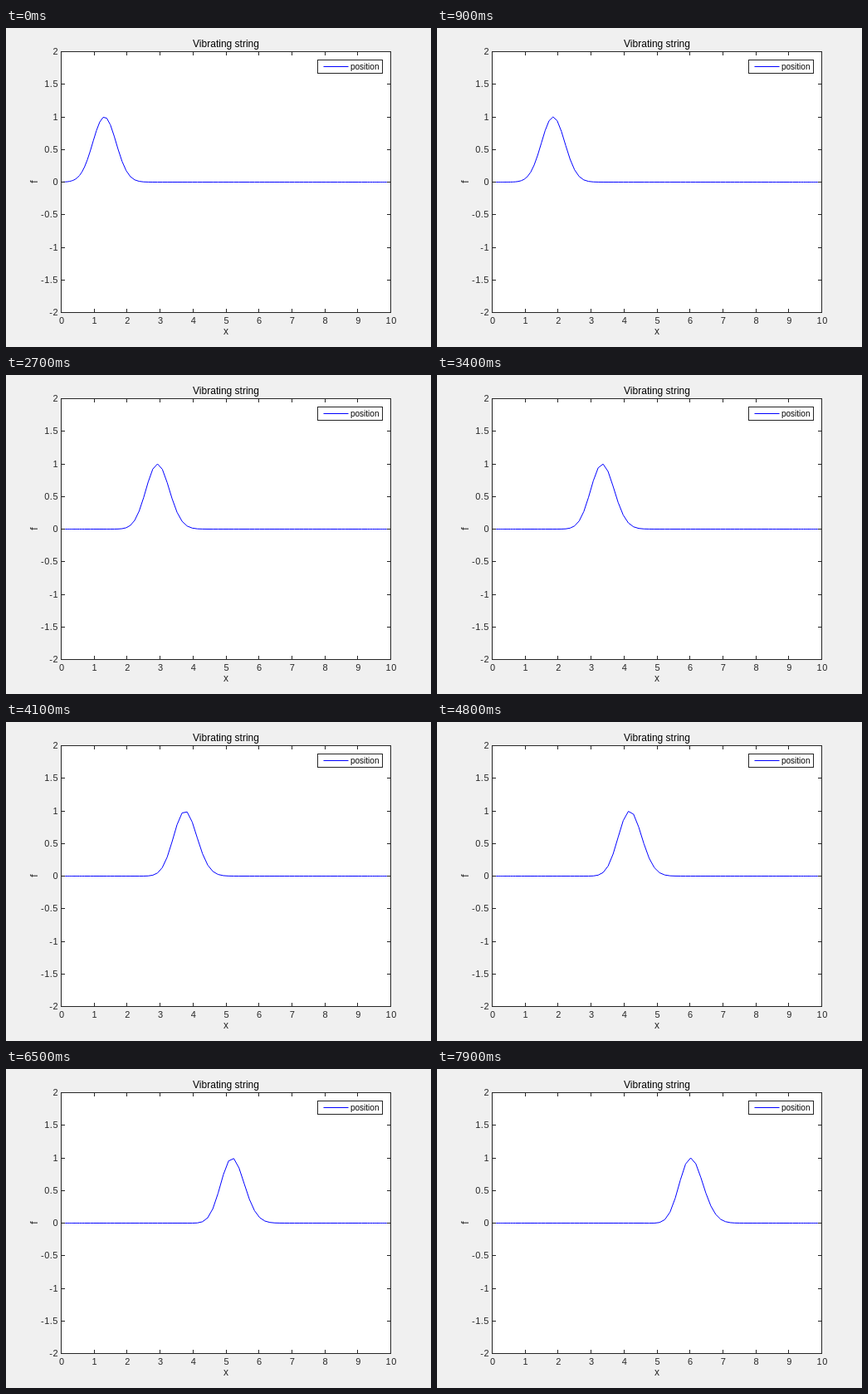
An HTML page for the animation above (8000 ms loop, 512 px wide and 384 px high).

```html
<!DOCTYPE html>
<html>
<head>
<meta charset="utf-8">
<title>Vibrating string</title>
<style>
  html, body { margin: 0; width: 100%; height: 100%; overflow: hidden; background: #f0f0f0; }
  svg { display: block; font: 11px "Liberation Sans", Arial, sans-serif; fill: #262626; }
  .axes { fill: none; stroke: #262626; shape-rendering: crispEdges; }
  .wave { fill: none; stroke: #00f; stroke-linejoin: round; }
  .name { font-size: 12px; }
  .mid { text-anchor: middle; }
  .end { text-anchor: end; }
  #labels { letter-spacing: 0.5px; }
</style>
</head>
<body>
<svg width="512" height="384" viewBox="0 0 512 384">
  <rect x="66.5" y="28.5" width="397" height="314" fill="#fff"/>
  <polyline id="wave" class="wave"/>
  <g class="axes">
    <rect x="66.5" y="28.5" width="397" height="314"/>
    <path id="ticks"/>
    <rect x="375.5" y="38.5" width="78" height="16" fill="#fff"/>
  </g>
  <path class="wave" d="M382.5 46.5H412.5"/>
  <g id="labels"></g>
  <text class="name mid" x="265" y="23" fill="#000">Vibrating string</text>
  <text class="name mid" x="265" y="369">x</text>
  <text class="name mid" transform="translate(38 185) rotate(-90)">f</text>
  <text x="415" y="49.5" font-size="10" fill="#000">position</text>
</svg>
<script>
const get = id => document.getElementById(id);
const px = x => 66.5 + 39.7 * x;
const py = y => 185.5 - 78.5 * y;
const STEP = 100, FRAMES = 80, N = 99, SIGMA = 0.3536;

// Chebyshev nodes on [0, 10]
const nodes = Array.from({ length: N + 1 }, (_, k) => 5 - 5 * Math.cos(Math.PI * k / N));

function drawAxes() {
  let ticks = "", labels = "";
  for (let i = 0; i <= 10; i++) {
    const x = Math.floor(px(i)) + 0.5;
    ticks += `M${x} 28v5M${x} 343v-5`;
    labels += `<text class="mid" x="${px(i) + 0.7}" y="356">${i}</text>`;
  }
  for (let v = -2; v <= 2; v += 0.5) {
    const y = Math.floor(py(v)) + 0.5;
    ticks += `M66 ${y}h5M464 ${y}h-5`;
    labels += `<text class="end" x="63" y="${py(v) + 3.5}">${v}</text>`;
  }
  get("ticks").setAttribute("d", ticks);
  get("labels").innerHTML = labels;
}

// Travelling Gaussian whose trailing side slowly steepens
function pulse(x, t) {
  const z = (x - 1.312 - 0.5963 * t) / SIGMA;
  const skew = 0.026 * t;
  return Math.exp(-z * z / 2) * (1 + skew * z ** 3 / 6);
}

function draw() {
  const t = Math.floor(performance.now() / STEP) % FRAMES * STEP / 1000;
  const points = nodes.map(x => px(x).toFixed(2) + "," + py(pulse(x, t)).toFixed(2));
  get("wave").setAttribute("points", points.join(" "));
  requestAnimationFrame(draw);
}

drawAxes();
draw();
</script>
</body>
</html>
```
